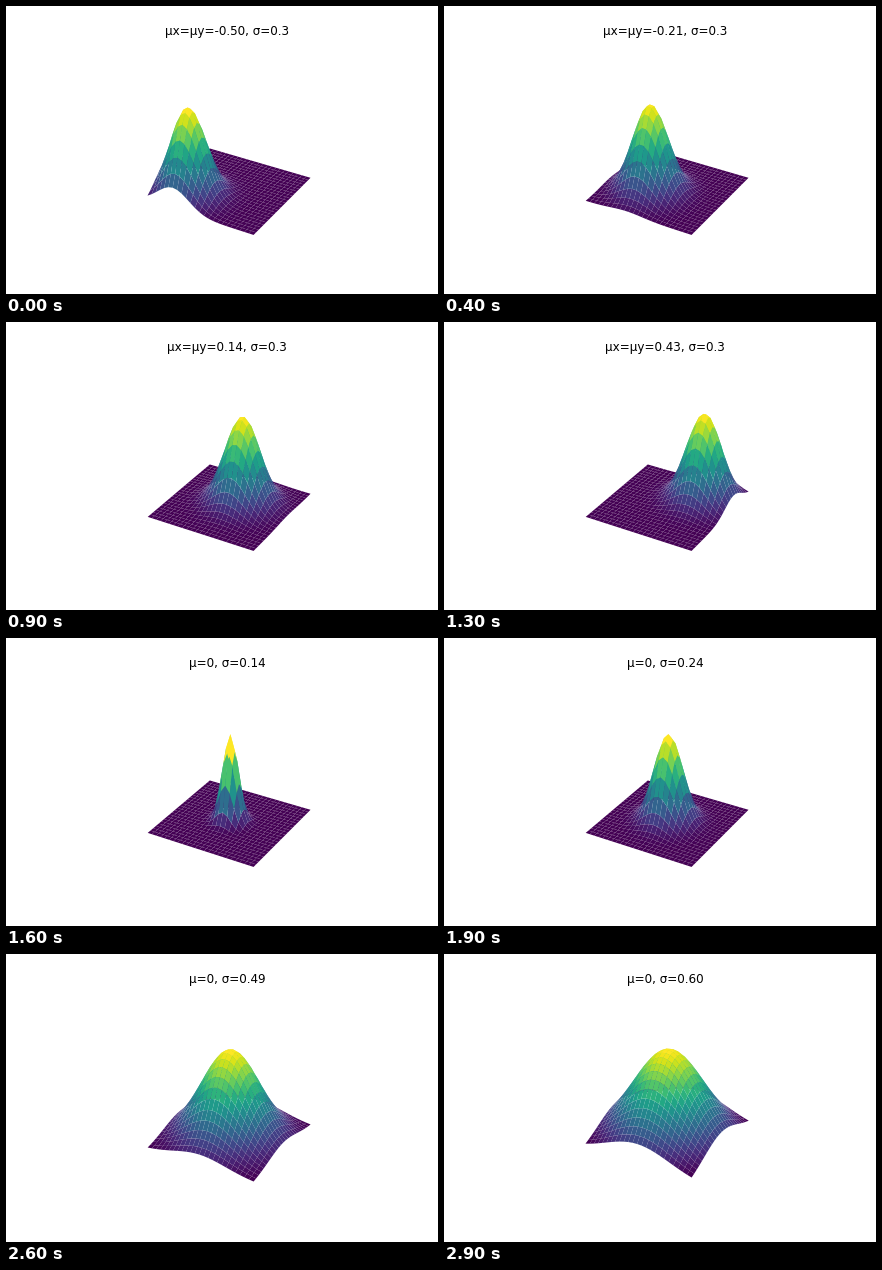
Animation of 432x288 px, one loop 3 s. Source, as a matplotlib script:

```python
import numpy as np
import matplotlib.pyplot as plt
from matplotlib.animation import FuncAnimation
from matplotlib.collections import PolyCollection

STEPS = 15          # frames in each of the two phases
POINTS = 25         # grid points along one side
HALF = 0.507        # half side of the base in view space
BASE, TOP = -0.40, 0.436
DIST = 10
ELEV, AZIM = np.radians(30), np.radians(-60)

MEANS = np.linspace(-0.5, 0.5, STEPS)
SIGMAS = np.linspace(0.1, 0.6, STEPS)
X, Y = np.meshgrid(np.linspace(-1, 1, POINTS), np.linspace(-1, 1, POINTS))


def corners(grid):
    """Four corner values of every cell, as an array of shape (cells, 4)."""
    parts = grid[:-1, :-1], grid[:-1, 1:], grid[1:, 1:], grid[1:, :-1]
    return np.stack([p.ravel() for p in parts], axis=1)


def project(x, y, z):
    """Perspective view: screen coordinates and distance from the eye."""
    toward = np.cos(AZIM) * x + np.sin(AZIM) * y
    depth = DIST - np.cos(ELEV) * toward - np.sin(ELEV) * z
    u = -np.sin(AZIM) * x + np.cos(AZIM) * y
    v = np.cos(ELEV) * z - np.sin(ELEV) * toward
    return u / depth, v / depth, depth


def surface(mean, sigma):
    """Cells sorted from far to near, with their mean heights."""
    z = np.exp(-((X - mean) ** 2 + (Y - mean) ** 2) / (2 * sigma ** 2))
    u, v, depth = project(HALF * X, HALF * Y, BASE + (TOP - BASE) * z)
    order = np.argsort(-corners(depth).mean(axis=1), kind="stable")
    cells = np.stack([corners(u), corners(v)], axis=2)
    return cells[order], corners(z).mean(axis=1)[order]


fig, ax = plt.subplots(figsize=(6, 4), dpi=72)
ax.axis("off")
low, high = -0.95 / DIST, 0.9 / DIST
box = ax.get_position()
ratio = 6 * box.width / (4 * box.height)
mid, reach = (low + high) / 2, (high - low) / 2 * ratio
ax.set_xlim(mid - reach, mid + reach)
ax.set_ylim(low, high)

mesh = PolyCollection([], cmap="viridis", edgecolors="none", linewidths=0,
                      antialiaseds=True)
ax.add_collection(mesh, autolim=False)
title = ax.set_title("", fontsize=12, family="DejaVu Sans")


def update(i):
    if i < STEPS:
        mean, sigma = MEANS[i], 0.3
        title.set_text(f"μx=μy={mean:.2f}, σ=0.3")
    else:
        mean, sigma = 0, SIGMAS[i - STEPS]
        title.set_text(f"μ=0, σ={sigma:.2f}")
    cells, heights = surface(mean, sigma)
    mesh.set_verts(cells)
    mesh.set_array(heights)
    mesh.set_clim(heights.min(), heights.max())
    return mesh, title


anim = FuncAnimation(fig, update, frames=2 * STEPS, interval=100, repeat=True)
plt.show()
```
